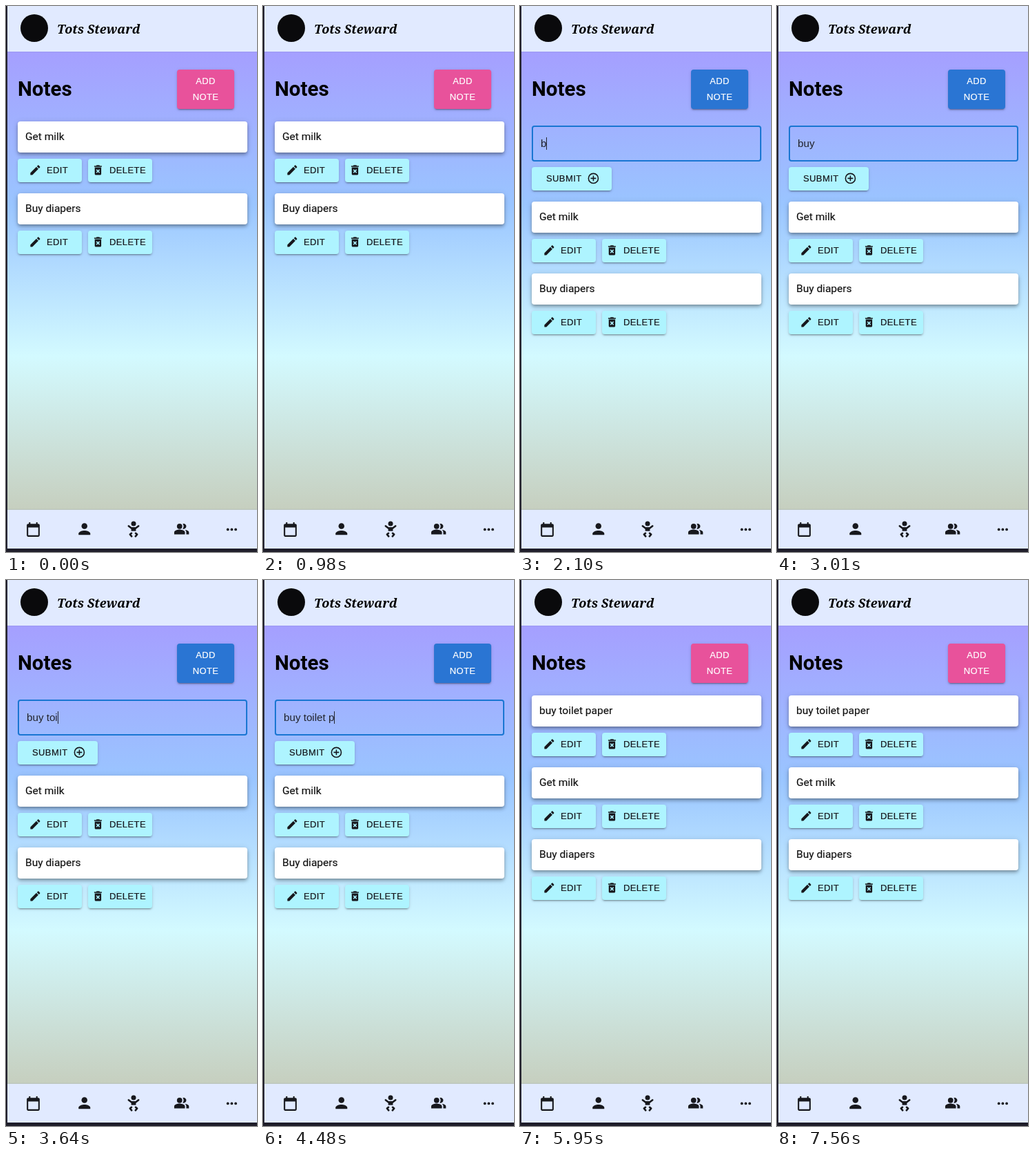
Animation of 364x790 px, one loop 7630 ms. Source, as an HTML page:

```html
<!DOCTYPE html>
<html lang="en">
<head>
<meta charset="utf-8">
<title>Notes</title>
<style>
html, body { margin: 0; width: 100%; height: 100%; overflow: hidden; background: #1f1e2a; }
div, svg { position: absolute; box-sizing: border-box; white-space: pre; }
svg { overflow: visible; fill: #17181d; }
#app { left: 2px; top: 0; width: 362px; height: 785px; overflow: hidden;
  background: linear-gradient(#a59fff 66px, #9ac5ff 287px, #d3faff 507px, #c6cfbf 728px); }
#stage { left: -2px; top: 0; width: 364px; height: 785px; }
#form, #list, .note { left: 0; top: 0; }
.bar { left: 0; width: 364px; background: #e1eaff; box-shadow: 0 0 2px #5a6a9a55; }
#logo { left: 21px; top: 12px; width: 40px; height: 40px; border-radius: 50%; background: #0a0a0c; }
#brand { left: 74px; top: 18px; font: italic bold 18px/30px "Noto Serif", serif; }
h1 { position: absolute; margin: 0; left: 17px; top: 100px; font: bold 29.5px/40px Roboto, sans-serif; }
.btn { height: 34px; border-radius: 4px; background: #aef4ff; color: #17181d;
  font: 13px/34px "Liberation Sans", Arial, sans-serif; letter-spacing: .4px; -webkit-text-stroke: .2px;
  box-shadow: 0 3px 1px -2px #0003, 0 2px 2px #00000024, 0 1px 5px #0000001f; }
#add { left: 248px; top: 91.5px; width: 83px; height: 57px; padding-top: 5px; overflow: hidden;
  line-height: 23px; text-align: center; color: #fff; }
#ripple { left: 41.5px; top: 28.5px; border-radius: 50%; background: #fff; }
.card { left: 17px; top: 0; width: 333px; height: 45px; padding-left: 11px; border-radius: 4px; background: #fff;
  font: 15.5px/45px Roboto, sans-serif; color: #111; -webkit-text-stroke: .15px;
  box-shadow: 0 2px 4px -1px #0004, 0 4px 5px #00000028, 0 1px 10px #0000001f; }
#field { left: 17px; top: 172.5px; width: 333px; height: 52px; padding-left: 11px;
  border: 2px solid #1976d2; border-radius: 4px; color: #22242c;
  font: 15.2px/48px "Liberation Sans", Arial, sans-serif; }
#caret { display: inline-block; width: 1px; height: 18px; background: #22242c; vertical-align: -4px; }
</style>
</head>
<body>
<div id="app"><div id="stage">
  <div class="bar" style="top:0;height:65.5px"></div>
  <div id="logo"></div>
  <div id="brand">Tots Steward</div>
  <h1>Notes</h1>
  <div class="btn" id="add">ADD
NOTE<div id="ripple"></div></div>
  <div id="form">
    <div id="field"><span id="typed"></span><span id="caret"></span></div>
  </div>
  <div id="list"></div>
  <div class="bar" id="nav" style="top:728.5px;height:57px"></div>
</div></div>
<script>
const LOOP = 7630, OPEN = 1190, SUBMIT = 5600, ROW = 104, FORM = 116;
const PINK = [232, 82, 155], BLUE = [42, 117, 211];
const TEXT = 'buy toilet paper';
const KEYS = [2100, 2240, 2380, 3220, 3360, 3500, 3640, 3780, 3920,
  4060, 4200, 4340, 4550, 4830, 4930, 5040];
const ICONS = {
  edit: '<path d="M3 17.25V21h3.75L17.81 9.94l-3.75-3.75L3 17.25zM20.71 7.04c.39-.39.39-1.02 0-1.41l-2.34-2.34c-.39-.39-1.02-.39-1.41 0l-1.83 1.83 3.75 3.75 1.83-1.83z"/>',
  bin: '<path fill-rule="evenodd" d="M6 19c0 1.1.9 2 2 2h8c1.1 0 2-.9 2-2V7H6v12zm2.46-7.12l1.41-1.41L12 12.59l2.12-2.12 1.41 1.41L13.41 14l2.12 2.12-1.41 1.41L12 15.41l-2.12 2.12-1.41-1.41L10.59 14zM15.5 4l-1-1h-5l-1 1H5v2h14V4z"/>',
  plus: '<g fill="none" stroke="#17181d" stroke-width="2"><circle cx="12" cy="12" r="9"/><path d="M12 7v10M7 12h10"/></g>',
  calendar: '<path fill-rule="evenodd" d="M19 4h-1V2h-2v2H8V2H6v2H5c-1.1 0-2 .9-2 2v14c0 1.1.9 2 2 2h14c1.1 0 2-.9 2-2V6c0-1.1-.9-2-2-2zm0 16H5V9h14v11z"/>',
  person: '<circle cx="12" cy="8" r="4"/><path d="M12 14c-2.67 0-8 1.34-8 4v2h16v-2c0-2.66-5.33-4-8-4z"/>',
  baby: '<circle cx="12" cy="4" r="3.5"/><path d="M8.6 9.4h6.8v5.3H8.6z"/><path d="M4.9 7.4L8.9 10.6H15.1L19.1 7.4M9 17.8L6.9 19.6L9.2 22.3M15 17.8L17.1 19.6L14.8 22.3" fill="none" stroke="#17181d" stroke-width="2.6" stroke-linecap="round" stroke-linejoin="round"/>',
  people: '<circle cx="9" cy="8" r="4"/><path d="M16.67 13.13C18.04 14.06 19 15.32 19 17v3h4v-3c0-2.18-3.57-3.47-6.33-3.87zM15 12c2.21 0 4-1.79 4-4s-1.79-4-4-4c-.47 0-.91.1-1.33.24C14.5 5.27 15 6.58 15 8s-.5 2.73-1.33 3.76c.42.14.86.24 1.33.24zM9 13c-2.67 0-8 1.34-8 4v3h16v-3c0-2.66-5.33-4-8-4z"/>',
  more: '<circle cx="6" cy="12" r="2"/><circle cx="12" cy="12" r="2"/><circle cx="18" cy="12" r="2"/>'
};
const $ = id => document.getElementById(id);

// Icon centred on (x, y)
const icon = (name, x, y, size) =>
  `<svg viewBox="0 0 24 24" width="${size}" height="${size}" style="left:${x - size / 2}px;top:${y - size / 2}px">${ICONS[name]}</svg>`;

const button = (x, y, w, label, textX, name, iconX) =>
  `<div class="btn" style="left:${x}px;top:${y}px;width:${w}px">` +
  `<div style="left:${textX}px;top:0">${label}</div>${icon(name, iconX, 17, 18.8)}</div>`;

const note = text => `<div class="note"><div class="card">${text}</div>` +
  button(17, 54, 93, 'EDIT', 42, 'edit', 25) +
  button(119, 54, 93, 'DELETE', 31, 'bin', 14.5) + '</div>';

$('form').innerHTML += button(17, 232.5, 116, 'SUBMIT', 21, 'plus', 89);
$('list').innerHTML = [TEXT, 'Get milk', 'Buy diapers'].map(note).join('');
$('nav').innerHTML = icon('calendar', 39, 28.5, 25) + icon('person', 113.5, 28.5, 25.5) +
  icon('baby', 185, 28.5, 24) + icon('people', 255, 28.5, 23.3) + icon('more', 327.5, 28.5, 22.8);
const notes = [...document.querySelectorAll('.note')];

const clamp = v => Math.max(0, Math.min(1, v));
const ease = v => v * v * (3 - 2 * v);
const fade = (t, start) => ease(clamp((t - start) / 250));

function draw() {
  const t = performance.now() % LOOP;
  const open = t >= OPEN && t < SUBMIT, saved = t >= SUBMIT;

  const blue = fade(t, OPEN - 30) - fade(t, SUBMIT - 20);
  $('add').style.background = `rgb(${PINK.map((c, i) => c + (BLUE[i] - c) * blue)})`;
  const size = 110 * ease(clamp((t - OPEN) / 350));
  Object.assign($('ripple').style, {
    width: size + 'px', height: size + 'px', margin: `${-size / 2}px`,
    opacity: t < OPEN ? 0 : .1 * (1 - clamp((t - 1400) / 450))
  });

  const count = KEYS.filter(k => k <= t).length;
  const idle = t - (count ? KEYS[count - 1] : OPEN + 70);
  $('form').style.display = open ? '' : 'none';
  $('typed').textContent = TEXT.slice(0, count);
  $('caret').style.opacity = idle >= 0 && idle % 1000 < 500 ? 1 : 0;

  notes.forEach((n, i) => {
    const row = saved ? i : i - 1;
    n.style.display = row < 0 ? 'none' : '';
    n.style.top = 166.5 + row * ROW + (open ? FORM : 0) + 'px';
  });
  requestAnimationFrame(draw);
}
draw();
</script>
</body>
</html>
```
